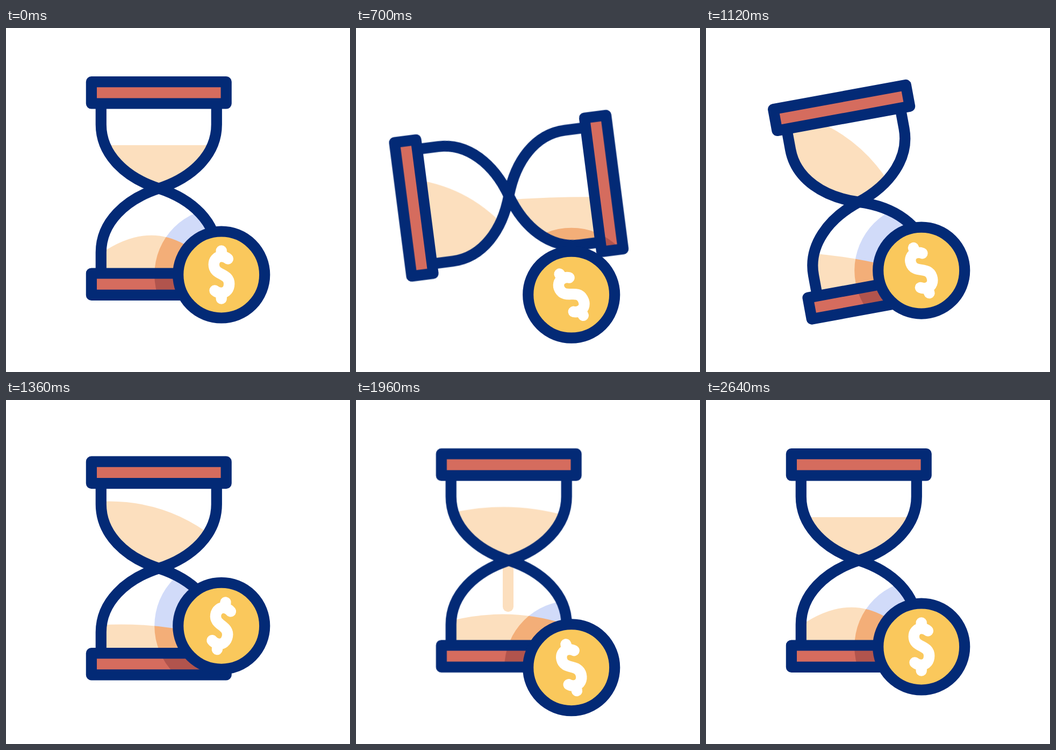
These frames come from a looping animation (640 by 640 pixels, 3 s). An HTML page:

```html
<!DOCTYPE html>
<html lang="en">
<head>
<meta charset="utf-8">
<title>Hourglass and coin</title>
<style>
  html, body { margin: 0; width: 100%; height: 100%; overflow: hidden; background: #fff; }
  svg { display: block; width: 100vw; height: 100vh; }
  .ink { fill: none; stroke: #032a76; stroke-width: 20.2; stroke-linejoin: round; }
  .sand { fill: #fcdfbe; }
  .red { fill: #d56c5e; }
  .stream { fill: none; stroke: #fcdfbe; stroke-width: 20; stroke-linecap: round; }
  .sign { fill: none; stroke: #fff; stroke-width: 20.4; stroke-linecap: round; stroke-linejoin: round; }
</style>
</head>
<body>
<svg viewBox="0 0 640 640">
  <defs>
    <path id="bulb" d="M-107.5-155V-119C-107.5-63-62-20 0 0C62-20 107.5-63 107.5-119V-155"/>
    <rect id="cap" x="-125.4" y="-198.4" width="250.8" height="40.4"/>
    <clipPath id="chamberA"><use href="#bulb"/></clipPath>
    <clipPath id="chamberB"><use href="#bulb" transform="scale(1 -1)"/></clipPath>
    <clipPath id="sandA" clip-path="url(#chamberA)"><path id="surfaceA"/></clipPath>
    <clipPath id="sandB" clip-path="url(#chamberB)"><path id="surfaceB"/></clipPath>
    <clipPath id="caps"><use href="#cap"/><use href="#cap" transform="scale(1 -1)"/></clipPath>
  </defs>

  <g id="glass">
    <g clip-path="url(#chamberA)">
      <circle class="shade" r="124.5" fill="#d1dbf9"/>
      <path id="stream" class="stream"/>
    </g>
    <g clip-path="url(#chamberB)"><circle class="shade" r="124.5" fill="#d1dbf9"/></g>
    <g clip-path="url(#sandA)">
      <rect class="sand" x="-130" y="-170" width="260" height="340"/>
      <circle class="shade" r="124.5" fill="#f3ae78"/>
    </g>
    <g clip-path="url(#sandB)">
      <rect class="sand" x="-130" y="-170" width="260" height="340"/>
      <circle class="shade" r="124.5" fill="#f3ae78"/>
    </g>
    <g clip-path="url(#caps)">
      <rect class="red" x="-130" y="-200" width="260" height="400"/>
      <circle class="shade" r="124.5" fill="#b1544d"/>
    </g>
    <g class="ink">
      <use href="#bulb"/><use href="#cap"/>
      <g transform="scale(1 -1)"><use href="#bulb"/><use href="#cap"/></g>
    </g>
  </g>

  <g id="coin">
    <circle class="ink" r="80.5" style="fill:#fac85c"/>
    <path id="sign" class="sign" d="M0-44.5V-34M0 34V44.5M12.2-29.5C9-32.5 4.5-34 0-34C-8.5-34-14-27-14-19
      C-14 2 14.5-4 14.5 17C14.5 27 8.5 34 0 34C-4.5 34-9 32.5-12.2 29.5"/>
  </g>
</svg>
<script>
const LOOP = 3000, START = 180, END = 2640;
const CX = 284.3, CY = 298.5, COIN_X = 400.7, COIN_Y = 459;
const PIVOT = 88;   // depth in each chamber about which its sand sways
const $ = id => document.getElementById(id);
const shades = document.querySelectorAll('.shade');

const clamp = u => Math.min(1, Math.max(0, u));
const smooth = u => u * u * (3 - 2 * u);

// Eased value along [time, value] keys
function track(...keys) {
  return t => keys.slice(1).reduce((v, [t1, v1], i) => {
    const [t0, v0] = keys[i];
    return t < t0 ? v : v0 + (v1 - v0) * smooth(clamp((t - t0) / (t1 - t0)));
  }, keys[0][1]);
}

const spin = track([START, 0], [1282, 180]);
const drop = track([START, 0], [1180, 25.5], [1580, 0]);
const bob = track([START, 0], [780, 39], [1380, -39], [1980, 39], [2580, 0]);
const swing = track([START, 0], [880, -35.5], [1590, 25], [2080, -20], [END, 0]);

// Sand surface: tilt against the horizon, height over the pivot, bend of the mound
const MOUND = { tilt: 6.7, level: 0, bend: 38.5 }, FLAT = { tilt: 0, level: -7.5, bend: 0 };
const sandA = {
  side: -1,
  tilt: track([START, FLAT.tilt], [580, -3.5], [1120, 11], [1620, 0], [END, MOUND.tilt]),
  level: track([340, FLAT.level], [1120, -23], [1620, -16.5], [END, MOUND.level]),
  bend: track([START, FLAT.bend], [1760, 8], [END, MOUND.bend])
};
const sandB = {
  side: 1,
  tilt: track([START, MOUND.tilt], [300, 2], [1000, 45], [1620, 2], [END, FLAT.tilt]),
  level: track([START, MOUND.level], [1120, 22], [1500, 22], [END, FLAT.level]),
  bend: track([START, MOUND.bend], [640, 17], [1620, 14.5], [END, FLAT.bend])
};

function drawSand(el, sand, t, angle) {
  const y = -sand.level(t), b = 4 * sand.bend(t);
  el.setAttribute('transform', `translate(0 ${sand.side * PIVOT}) rotate(${sand.tilt(t) - angle})`);
  el.setAttribute('d', `M-190 ${y + b}Q0 ${y - b} 190 ${y + b}V400H-190Z`);
}

function draw(t) {
  const angle = spin(t), y = CY + drop(t), coinY = COIN_Y + bob(t);
  $('glass').setAttribute('transform', `translate(${CX} ${y}) rotate(${angle})`);
  $('coin').setAttribute('transform', `translate(${COIN_X} ${coinY})`);
  $('sign').setAttribute('transform', `rotate(${swing(t)})`);

  // The coin's shadow stays around the coin while the glass turns
  for (const el of shades) {
    el.setAttribute('transform', `rotate(${-angle}) translate(${COIN_X - CX} ${coinY - y})`);
  }

  drawSand($('surfaceA'), sandA, t, angle);
  drawSand($('surfaceB'), sandB, t, angle);

  const fall = t0 => 125 * clamp((t - t0) / 200) - 15;
  const tip = fall(1800), top = fall(2340);
  $('stream').setAttribute('d', tip > top ? `M1.3 ${-top}V${-tip}` : '');
}

function tick(now) {
  draw(now % LOOP);
  requestAnimationFrame(tick);
}
draw(0);
requestAnimationFrame(tick);
</script>
</body>
</html>
```
